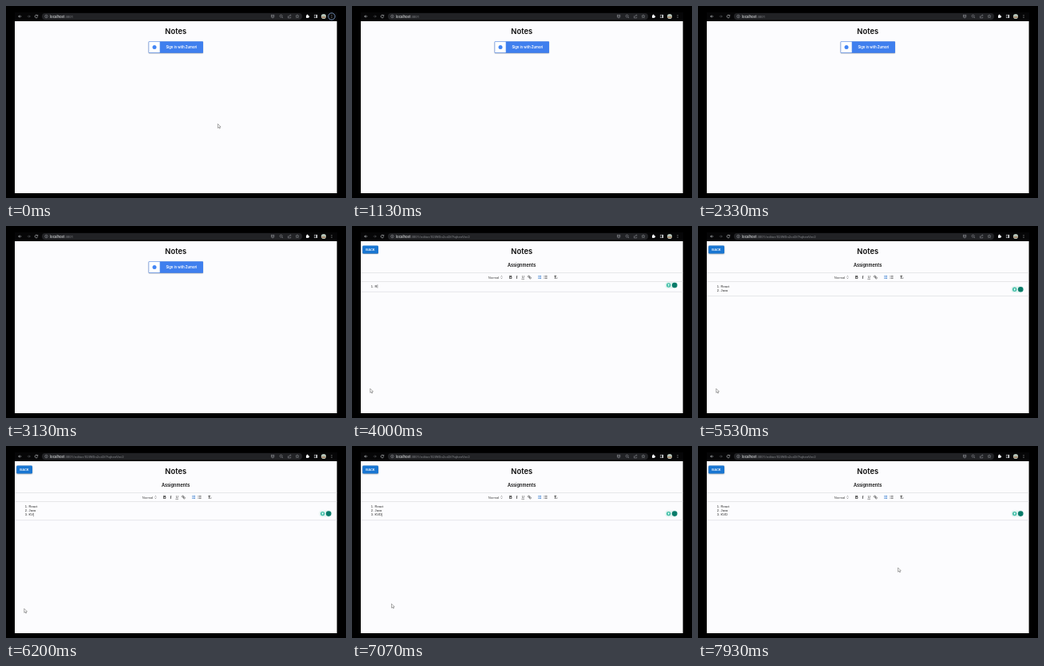
These frames come from a looping animation (426x240 px, 8000 ms). An HTML page with a canvas:

```html
<!DOCTYPE html>
<html lang="en">
<head>
<meta charset="utf-8">
<title>Notes</title>
<style>
html, body { margin: 0; width: 100%; height: 100%; overflow: hidden; background: #000; }
canvas { display: block; width: 100vw; height: 100vh; }
</style>
</head>
<body>
<canvas id="stage"></canvas>
<script>
const W = 426, H = 240, LOOP = 8000;
const EDITOR_AT = 3530;
const canvas = document.getElementById('stage');
const ctx = canvas.getContext('2d');

const UI = 'Roboto, sans-serif';
const HEAD = 'Inter, sans-serif';
const BODY = '"Liberation Sans", Arial, sans-serif';

// Each line: text, time of its first letter, delay between letters, time its row opens
const items = [
  { word: 'React', start: 3900, step: 150, open: EDITOR_AT },
  { word: 'Java', start: 5000, step: 130, open: 4750 },
  { word: 'KVD', start: 5900, step: 200, open: 5650 }
];

function rect(x, y, w, h, color) {
  ctx.fillStyle = color;
  ctx.fillRect(x, y, w, h);
}

function round(x, y, w, h, r, color) {
  ctx.fillStyle = color;
  ctx.beginPath();
  ctx.roundRect(x, y, w, h, r);
  ctx.fill();
}

function disc(x, y, r, color) {
  ctx.fillStyle = color;
  ctx.beginPath();
  ctx.arc(x, y, r, 0, Math.PI * 2);
  ctx.fill();
}

function ring(x, y, r, color, width = 0.6, from = 0, to = Math.PI * 2) {
  ctx.strokeStyle = color;
  ctx.lineWidth = width;
  ctx.beginPath();
  ctx.arc(x, y, r, from, to);
  ctx.stroke();
}

function line(points, color, width = 0.6) {
  ctx.strokeStyle = color;
  ctx.lineWidth = width;
  ctx.beginPath();
  points.forEach(([x, y], i) => i ? ctx.lineTo(x, y) : ctx.moveTo(x, y));
  ctx.stroke();
}

function text(str, x, y, size, family, color, weight = 400, align = 'left') {
  ctx.font = `${weight} ${size}px ${family}`;
  ctx.textAlign = align;
  ctx.fillStyle = color;
  ctx.fillText(str, x, y);
  return ctx.measureText(str).width;
}

function shadowed(blur, draw) {
  ctx.save();
  ctx.shadowColor = 'rgba(0,0,0,.4)';
  ctx.shadowBlur = blur * canvas.width / W;
  ctx.shadowOffsetY = 0.5 * canvas.height / H;
  draw();
  ctx.restore();
}

function arrow(x, y, dir, color) {
  line([[x - 1.8, y], [x + 1.8, y]], color);
  line([[x + dir * 0.3, y - 1.5], [x + dir * 1.8, y], [x + dir * 0.3, y + 1.5]], color);
}

function star(x, y, r, color) {
  const points = [];
  for (let i = 0; i <= 10; i++) {
    const a = -Math.PI / 2 + i * Math.PI / 5;
    const d = i % 2 ? r * 0.45 : r;
    points.push([x + d * Math.cos(a), y + d * Math.sin(a)]);
  }
  line(points, color, 0.45);
}

function browserBar(t) {
  const pale = '#d5d8dc', dim = '#a0a3a8', y = 13;
  rect(11, 8, 404, 11, '#060607');
  round(45, 9, 326, 8.2, 4.1, '#212225');

  arrow(17.5, y, -1, pale);
  arrow(28.5, y, 1, '#5b5e62');
  ring(38, y, 1.8, pale, 0.6, 0.3, 5.4);
  line([[39.8, 10.9], [39.8, 12.3], [38.4, 12.3]], pale);

  ring(50.5, y, 1.8, dim, 0.5);
  line([[50.5, 12.7], [50.5, 14]], dim, 0.5);
  rect(50.25, 11.8, 0.5, 0.5, dim);
  const w = text('localhost', 55, 14.6, 4.5, UI, '#eceef0');
  const path = t < EDITOR_AT ? '' : '/editor/S2IWDn2cd2f7tqhenVec2';
  text(':3001' + path, 55 + w, 14.6, 4.3, UI, '#85888c');

  ctx.strokeStyle = dim;
  ctx.lineWidth = 0.5;
  ctx.strokeRect(332.5, 11.2, 3.4, 2.7);
  line([[333.3, 14.8], [335.2, 14.8]], dim, 0.5);
  line([[334.2, 11.7], [334.2, 13.1]], dim, 0.5);
  ring(344.6, 12.6, 1.5, dim, 0.5);
  line([[345.7, 13.7], [347, 15]], dim);
  line([[353.4, 12.4], [353.4, 14.9], [356.7, 14.9], [356.7, 13.7]], dim, 0.5);
  line([[354.6, 13.5], [355.2, 11.8], [357.2, 11.8], [356.2, 10.9]], dim, 0.5);
  star(365, y, 2.2, dim);

  rect(376, 11.6, 3.3, 3.3, '#f0f1f2');
  disc(377.6, 11.4, 0.8, '#f0f1f2');
  disc(379.5, 13.3, 0.8, '#f0f1f2');
  ctx.strokeStyle = '#e2e4e7';
  ctx.strokeRect(386.2, 11.1, 3.7, 3.7);
  rect(388.4, 11.1, 1.5, 3.7, '#e2e4e7');
  disc(398, y, 3.1, '#b4c4b8');
  round(395.3, 12.9, 5.4, 2, 1, '#a8896f');
  for (let i = -1; i <= 1; i++) disc(408, y + i * 1.5, 0.45, '#e2e4e7');
  if (t < 600) ring(408, y, 4.2, '#86a9d8', 0.8);
}

function signIn() {
  shadowed(1.2, () => round(178.7, 44.2, 68.3, 14.5, 0.7, '#3f7fee'));
  rect(179.2, 44.7, 13.5, 13.5, '#fff');
  disc(186, 51.4, 2.5, '#4285f4');
  text('Sign in with Zumori', 219.8, 53.1, 4.5, UI, '#fff', 500, 'center');
}

function listIcon(x, color) {
  for (let i = -1; i <= 1; i++) {
    const y = 64 + i * 1.5;
    rect(x - 2, y - 0.3, 0.8, 0.6, color);
    rect(x - 0.7, y - 0.3, 2.8, 0.6, color);
  }
}

function toolbar() {
  const ink = '#444';
  text('Normal', 170.8, 65.5, 4.2, BODY, ink);
  line([[186.5, 63.4], [187.4, 62.4], [188.3, 63.4]], ink, 0.5);
  line([[186.5, 64.7], [187.4, 65.7], [188.3, 64.7]], ink, 0.5);
  text('B', 198.7, 65.8, 5, BODY, '#222', 700, 'center');
  text('I', 206.5, 65.8, 5, BODY, '#222', 'italic 700', 'center');
  text('U', 214.2, 65.3, 4.3, BODY, '#222', 400, 'center');
  line([[212.4, 66.3], [216, 66.3]], '#222', 0.5);
  ring(221.5, 63.1, 1.1, ink);
  ring(223.3, 64.9, 1.1, ink);
  line([[221.7, 63.3], [223.1, 64.7]], ink);
  listIcon(235, '#1769c8');
  listIcon(242.5, ink);
  text('T', 254.5, 65.6, 4.8, BODY, '#222', 'italic 700', 'center');
  line([[255.6, 64.4], [257.2, 66]], ink, 0.5);
  line([[257.2, 64.4], [255.6, 66]], ink, 0.5);
}

function editor(t) {
  shadowed(t < 5400 ? 1 : 2, () => round(13.2, 24.6, 19.8, 10, 1.4, '#1976d2'));
  text('BACK', 23, 31.1, 4.4, UI, '#fff', 500, 'center');
  text('Assignments', 212.6, 50.5, 5.6, HEAD, '#111', 600, 'center');
  toolbar();

  const rows = items.filter(item => t >= item.open);
  const bottom = 76.9 + rows.length * 5.3;
  for (const y of [58.3, 69.5, bottom]) rect(11, y - 0.3, 403.5, 0.6, '#d9dadd');

  rows.forEach((item, i) => {
    const y = 76.8 + i * 5.3;
    const count = Math.floor((t - item.start) / item.step) + 1;
    const typed = item.word.slice(0, Math.max(0, count));
    text(`${i + 1}.`, 27.2, y, 4.1, BODY, '#222', 400, 'right');
    const w = text(typed, 28.6, y, 4.1, BODY, '#222');
    if (i === rows.length - 1 && t % 1000 < 500) rect(28.8 + w, y - 3.7, 0.4, 4.5, '#222');
  });

  const y = bottom - 8.2;
  round(392.3, y - 4, 15.9, 8, 4, '#e1f3ef');
  disc(396.7, y, 2.7, '#43bfa8');
  disc(396.7, y - 0.4, 1, '#e9fffa');
  rect(396.2, y + 0.6, 1, 0.9, '#e9fffa');
  disc(404.2, y, 3.3, '#087b69');
}

function ease(t, from, to) {
  const p = Math.min(1, Math.max(0, (t - from) / (to - from)));
  return p * p * (3 - 2 * p);
}

function pointer(t) {
  if (t > 900 && t < EDITOR_AT) return;
  const first = t < EDITOR_AT;
  const a = first ? [265.4, 147.4] : [22.8, 203.3];
  const b = first ? [222, 50] : [250.6, 152.2];
  const p = first ? ease(t, 200, 850) : ease(t, 6900, 7700);
  ctx.save();
  ctx.translate(a[0] + (b[0] - a[0]) * p, a[1] + (b[1] - a[1]) * p);
  const shape = new Path2D('M0 0V5.1L1.2 4L2 5.8L2.9 5.4L2.1 3.7H3.7Z');
  ctx.fillStyle = '#fff';
  ctx.strokeStyle = '#555';
  ctx.lineWidth = 0.5;
  ctx.fill(shape);
  ctx.stroke(shape);
  ctx.restore();
}

function draw(t) {
  rect(0, 0, W, H, '#000');
  rect(11, 18.7, 403.6, 215.3, '#fcfcfe');
  browserBar(t);
  text('Notes', 212.7, 34.9, 9.4, HEAD, '#080808', 600, 'center');
  if (t < EDITOR_AT) signIn();
  else editor(t);
  pointer(t);
}

function resize() {
  const dpr = window.devicePixelRatio || 1;
  canvas.width = Math.round(innerWidth * dpr);
  canvas.height = Math.round(innerHeight * dpr);
}

function frame() {
  ctx.setTransform(canvas.width / W, 0, 0, canvas.height / H, 0, 0);
  draw(performance.now() % LOOP);
  requestAnimationFrame(frame);
}

addEventListener('resize', resize);
resize();
frame();
</script>
</body>
</html>
```
